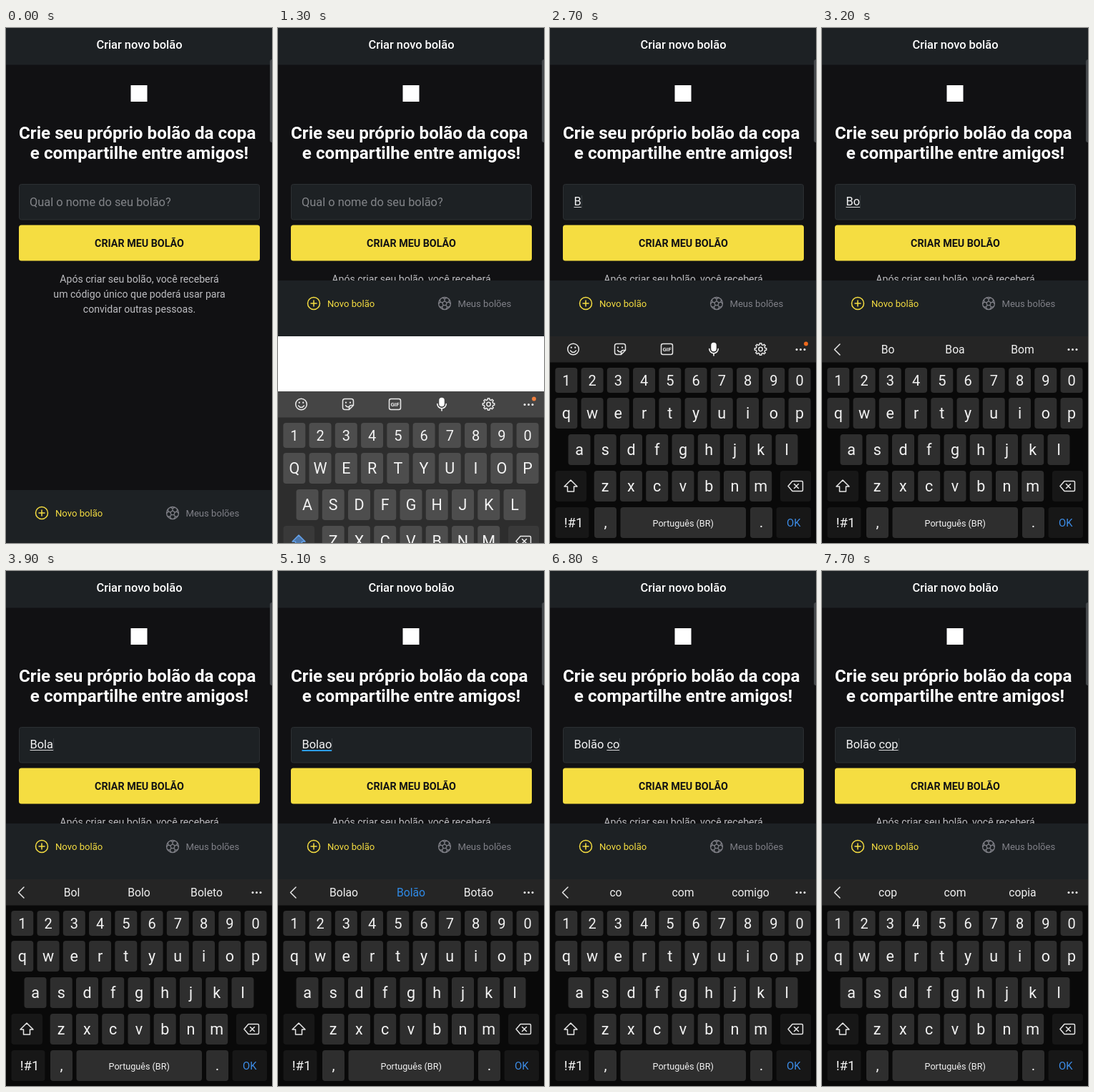
Recreate the animation shown at these times as an HTML page. Size 372 by 720 pixels, loop 8000 ms.

```html
<!DOCTYPE html>
<html lang="pt-BR">
<head>
<meta charset="utf-8">
<title>Criar novo bolão</title>
<style>
  html, body { margin: 0; width: 100%; height: 100%; overflow: hidden; background: #fff; }
  svg { position: absolute; left: 0; top: 0; display: block; }
  text, #field { font-family: Roboto, Arial, sans-serif; }
  .mid { text-anchor: middle; }
  .line { fill: none; stroke: #e6e6e6; stroke-width: 1.5; stroke-linecap: round; stroke-linejoin: round; }
  .key { fill: #2e2e2e; }
  .fn { fill: #171717; }
  .cap { fill: #f2f2f2; font-size: 21.5px; text-anchor: middle; }
  .word { fill: #f0f0f0; font-size: 15.7px; text-anchor: middle; }
  #field {
    position: absolute; left: 33.5px; top: 233.4px; height: 20px;
    font-size: 16.4px; line-height: 20px; color: #f4f4f5; white-space: pre;
  }
  #draft {
    text-decoration: underline 1px; text-underline-offset: 2px;
    text-decoration-skip-ink: none;
  }
  #caret {
    display: inline-block; width: 1px; height: 18px; background: #33383c;
    vertical-align: middle; margin-top: -3px;
  }
</style>
</head>
<body>
<svg width="372" height="720" viewBox="0 0 372 720">
  <rect width="372" height="720" fill="#fff"/>
  <rect id="page" width="372" height="720" fill="#111113"/>
  <rect width="372" height="51.5" fill="#1d2124"/>
  <text class="mid" x="186.5" y="28.5" font-size="16.4" font-weight="500" fill="#fff">Criar novo bolão</text>
  <rect x="369" y="44" width="6" height="116" rx="3" fill="#45484b"/>
  <rect x="174.5" y="80" width="23" height="23" fill="#fff"/>

  <g class="mid" font-size="24.2" font-weight="700" fill="#fff">
    <text x="183.7" y="154.5">Crie seu próprio bolão da copa</text>
    <text x="186.5" y="182.5">e compartilhe entre amigos!</text>
  </g>
  <rect x="18.5" y="218.5" width="336" height="49.5" rx="3" fill="#1d2124" stroke="#2c3033"/>
  <text id="hint" x="33" y="249" font-size="16.4" fill="#828488">Qual o nome do seu bolão?</text>
  <rect x="18" y="275.5" width="337" height="50" rx="3.5" fill="#f5dd41"/>
  <text class="mid" x="186.5" y="306" font-size="14.3" font-weight="700" fill="#121214">CRIAR MEU BOLÃO</text>
  <g class="mid" font-size="14.1" fill="#bdbdc1">
    <text x="186.5" y="356">Após criar seu bolão, você receberá</text>
    <text x="186.5" y="377">um código único que poderá usar para</text>
    <text x="186.5" y="398">convidar outras pessoas.</text>
  </g>

  <g id="nav">
    <rect y="646" width="372" height="78" fill="#1d2124"/>
    <g fill="none" stroke="#f5dd41" stroke-width="1.5" stroke-linecap="round">
      <circle cx="50" cy="678" r="8.5"/>
      <path d="M46 678h8M50 674v8"/>
    </g>
    <text x="69" y="682.8" font-size="13.1" fill="#f5dd41">Novo bolão</text>
    <g fill="none" stroke="#808188" stroke-width="1.3" stroke-linejoin="round">
      <circle cx="233" cy="678" r="8.5"/>
      <path id="ball"/>
    </g>
    <text x="251.5" y="682.8" font-size="13.1" fill="#808188">Meus bolões</text>
  </g>

  <g id="board">
    <rect y="431" width="372" height="300" fill="#090909"/>
    <rect y="431" width="372" height="36.5" fill="#252525"/>
    <g id="tools" class="line">
      <circle cx="32.5" cy="449" r="7.8"/>
      <path d="M28.5 451q4 5 8 0"/>
      <path d="M29.8 446.6v.2M35.2 446.6v.2" stroke-width="2.2"/>
      <path d="M93.500 441.500h9a3 3 0 0 1 3 3v6l-6 6h-6a3 3 0 0 1-3-3v-9a3 3 0 0 1 3-3zM105 450.500h-2.500q-3 0-3 3v2.500M94.500 450.500q2 3 4 2"/>
      <path d="M95 446.500v.2M101 446.500v.2" stroke-width="2.2"/>
      <rect x="155.500" y="441.500" width="16" height="15" rx="2.500"/>
      <text class="mid" x="163.500" y="452" font-size="8" font-weight="700" fill="#e6e6e6" stroke="none">GIF</text>
      <rect x="226" y="440.500" width="6" height="11" rx="3" fill="#fff" stroke="#fff"/>
      <path d="M222.800 448.500a6.200 6.200 0 0 0 12.400 0M229 455v3" stroke="#fff"/>
      <path id="gear"/>
      <circle cx="294.500" cy="449" r="2.700"/>
      <circle cx="358" cy="441.500" r="2.900" fill="#f06a1d" stroke="none"/>
    </g>
    <g id="words">
      <path class="line" d="M25 442l-7.500 7.500 7.500 7.500"/>
      <text class="word" x="92" y="455"></text>
      <text class="word" x="186" y="455"></text>
      <text class="word" x="280.500" y="455"></text>
    </g>
    <g fill="#f0f0f0">
      <circle cx="345" cy="449.500" r="1.500"/><circle cx="350.500" cy="449.500" r="1.500"/><circle cx="356" cy="449.500" r="1.500"/>
    </g>
    <g id="keys"></g>
    <path id="shift" class="line" d="M29 632l9 9h-4.500v7h-9v-7h-4.500z"/>
    <path class="line" d="M339 633.500h13a1.500 1.500 0 0 1 1.500 1.500v11a1.500 1.500 0 0 1-1.500 1.500h-13l-6-7zM341.500 637.500l6 6M347.500 637.500l-6 6"/>
    <g id="popup">
      <rect id="lit" width="31" height="43" rx="4" fill="#484848"/>
      <rect id="bubble" width="58" height="50" rx="8" fill="#505050"/>
      <text id="big" class="mid" font-size="27" fill="#fff"></text>
    </g>
  </g>
</svg>
<div id="field"><span id="done"></span><span id="draft"></span><span id="caret"></span></div>

<script>
const $ = id => document.getElementById(id);
const LOOP = 8000, STEP = 100, PITCH = 36.25;

function add(parent, tag, attrs, text) {
  const el = document.createElementNS('http://www.w3.org/2000/svg', tag);
  for (const k in attrs) el.setAttribute(k, attrs[k]);
  if (text) el.textContent = text;
  parent.appendChild(el);
  return el;
}

const polar = (cx, cy, r, turn) =>
  (cx + r * Math.sin(turn * 2 * Math.PI)).toFixed(2) + ' ' + (cy - r * Math.cos(turn * 2 * Math.PI)).toFixed(2);

// Football: pentagon, spokes and rim patches
let ball = 'M' + [0, 1, 2, 3, 4].map(i => polar(233, 678, 3.3, i / 5)).join('L') + 'Z';
for (let i = 0; i < 5; i++) {
  const a = i / 5;
  ball += `M${polar(233, 678, 3.3, a)}L${polar(233, 678, 6.2, a)}` +
    `M${polar(233, 678, 8.5, a - .06)}L${polar(233, 678, 6.2, a)}L${polar(233, 678, 8.5, a + .06)}`;
}
$('ball').setAttribute('d', ball);

// Gear with eight teeth
const teeth = [];
for (let i = 0; i < 8; i++) {
  [[-.037, 6.4], [-.024, 8.3], [.024, 8.3], [.037, 6.4]]
    .forEach(([d, r]) => teeth.push(polar(294.5, 449, r, i / 8 + d)));
}
$('gear').setAttribute('d', 'M' + teeth.join('L') + 'Z');

// Keyboard
const keys = {}, letters = [];
function keyBox(x, y, w, h, cls = 'key') {
  add($('keys'), 'rect', { x, y, width: w, height: h, rx: 4, class: cls });
}
function row(chars, x0, y, h, size) {
  [...chars].forEach((c, i) => {
    const x = x0 + i * PITCH;
    keyBox(x - 15.5, y, 31, h);
    const label = add($('keys'), 'text', {
      x, y: y + h / 2 + size * .355, class: 'cap', style: `font-size:${size}px`
    }, c);
    keys[c] = { x, y };
    if (c > '9') letters.push({ label, c });
  });
}
row('1234567890', 22.8, 475, 35, 20);
row('qwertyuiop', 22.8, 517, 43, 21.5);
row('asdfghjkl', 41, 568, 43, 21.5);
row('zxcvbnm', 77.2, 619, 43, 21.5);
keyBox(7.5, 619, 43.5, 43, 'fn');
keyBox(322, 619, 43, 43, 'fn');
keyBox(7.5, 670, 47, 43, 'fn');
keyBox(62, 670, 31, 43);
keyBox(98.5, 670, 175.5, 43);
keyBox(280, 670, 31, 43);
keyBox(316.5, 670, 48.5, 43, 'fn');
[['!#1', 33, 698, 18.5], [',', 77.5, 698, 21], ['Português (BR)', 186.2, 696.5, 12.6],
 ['.', 295.5, 698, 21], ['OK', 340.7, 697, 14.8, '#3d8de8']].forEach(([s, x, y, size, fill = '#f2f2f2']) =>
  add($('keys'), 'text', { x, y, class: 'cap', style: `font-size:${size}px;fill:${fill}` }, s));

// Timelines: [start ms, value...]
const slide = [[0, 300, 0], [1200, 190, .5], [1300, 77, .85], [1400, 22, .97], [1500, 0, 1]];
const typed = [[0, '', ''], [2100, '', 'B'], [3000, '', 'Bo'], [3400, '', 'Bol'], [3900, '', 'Bola'],
  [4300, '', 'Bolao'], [5500, 'Bolão ', ''], [6300, 'Bolão ', 'c'], [6600, 'Bolão ', 'co'], [7100, 'Bolão ', 'cop']];
const hints = [[0, ''], [3100, 'Bo Boa Bom'], [3600, 'Bol Bolo Boleto'], [4700, 'Bolao Bolão Botão'],
  [5700, 'o e a'], [6700, 'co com comigo'], [7400, 'cop com copia']];
const presses = [[2000, 'b'], [2900, 'o'], [3300, 'l'], [3800, 'a'], [4200, 'o'], [6200, 'c'], [6500, 'o'], [7000, 'p']];

const at = (list, t) => list.filter(e => e[0] <= t).pop();

function press(t, upper) {
  const hit = presses.find(([s]) => t >= s && t < s + STEP);
  $('popup').style.display = hit ? '' : 'none';
  if (!hit) return;
  const { x, y } = keys[hit[1]];
  const cx = Math.min(337, Math.max(35, x));
  $('lit').setAttribute('x', x - 15.5);
  $('lit').setAttribute('y', y);
  $('bubble').setAttribute('x', cx - 29);
  $('bubble').setAttribute('y', y - 51);
  $('big').setAttribute('x', cx);
  $('big').setAttribute('y', y - 16);
  $('big').textContent = upper ? hit[1].toUpperCase() : hit[1];
}

function draw(t) {
  const open = t >= 1200, upper = t < 2200;
  const [, dy, alpha] = at(slide, t);
  $('page').setAttribute('height', open ? 431 : 720);
  $('nav').setAttribute('transform', `translate(0 ${open ? -293 : 0})`);
  $('board').setAttribute('transform', `translate(0 ${dy})`);
  $('board').setAttribute('opacity', alpha);

  letters.forEach(({ label, c }) => label.textContent = upper ? c.toUpperCase() : c);
  $('shift').style.stroke = upper ? '#4a94ea' : '';
  $('shift').style.fill = upper ? '#2d5f9c' : '';

  const [, done, draft] = at(typed, t);
  $('done').textContent = done;
  $('draft').textContent = draft;
  const wrong = draft === 'Bolao' && t >= 4900;
  $('draft').style.textDecorationColor = wrong ? '#2b9df0' : '#d8d8da';
  $('draft').style.textDecorationThickness = wrong ? '1.5px' : '1px';
  $('hint').style.display = done + draft ? 'none' : '';
  $('caret').style.display = done + draft ? '' : 'none';

  const line = at(hints, t)[1];
  $('tools').style.display = line ? 'none' : '';
  $('words').style.display = line ? '' : 'none';
  const words = line.split(' ');
  $('words').querySelectorAll('text').forEach((el, i) => {
    el.textContent = words[i] || '';
    el.style.fill = words[i] === 'Bolão' ? '#2f8ae6' : '';
  });
  press(t, upper);
}

const start = performance.now();
let last = -1;
function tick() {
  const t = Math.floor(((performance.now() - start) % LOOP) / STEP) * STEP;
  if (t !== last) draw(last = t);
  requestAnimationFrame(tick);
}
tick();
</script>
</body>
</html>
```
